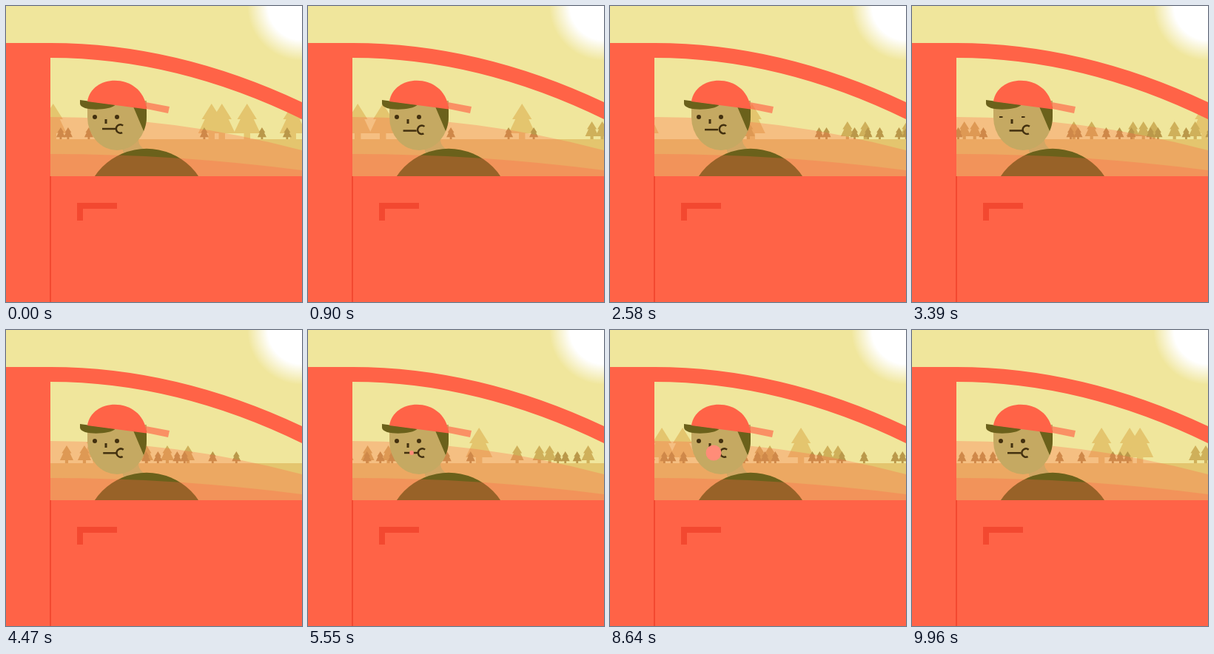
An HTML page with a canvas that plays this animation: 400 by 400 pixels, repeating every 9.99 s.

```html
<!DOCTYPE html>
<html lang="en">
<head>
<meta charset="utf-8">
<title>Country drive</title>
<style>
  html, body { margin: 0; width: 100%; height: 100%; overflow: hidden; background: #ff6347; }
  canvas { display: block; }
</style>
</head>
<body>
<canvas id="stage" width="400" height="400"></canvas>
<script>
const ctx = document.getElementById('stage').getContext('2d');
const LOOP = 9990;
const SKY = '#f0e69c', GROUND = '#e4c56e', CAR = '#ff6347', TRIM = '#f34830';
const OLIVE = '#6b611b', SKIN = '#c5a962', INK = '#42300f', GLASS = 'rgba(255,99,71,.3)';
const TREE = new Path2D('M0-16 4.4-9H3L6-2.7H1.4V0H-1.4V-2.7H-6L-3-9H-4.4Z');

// Nearer trees are bigger and pass faster, both by the same scale.
// An odd place holds a pair of trees, an even place a single one.
const ROWS = [
  { scale: 3, color: GROUND, spread: 7,
    places: [64, 285, 326, 388, 514, 694, 798, 838, 1246, 1630, 2262, 2290, 2450, 2790, 2835] },
  { scale: 1.5, color: '#cfb05a', spread: 7,
    places: [503, 644, 668, 724, 745, 780, 808, 982, 1019, 1078, 1148, 1262, 1305, 1397, 1657] },
  { scale: 1, color: '#ba984a', spread: 5,
    places: [79, 112, 268, 346, 380, 503, 546, 564, 580, 611, 654, 686, 809, 830, 912, 935, 954,
      1009, 1044, 1074, 1121, 1136] }
];
const BUBBLES = [5370, 7985];

const clamp = v => Math.max(0, Math.min(1, v));

function fill(color, path) {
  ctx.fillStyle = color;
  ctx.fill(new Path2D(path));
}

function circle(color, x, y, r) {
  ctx.fillStyle = color;
  ctx.beginPath();
  ctx.arc(x, y, r, 0, 2 * Math.PI);
  ctx.fill();
}

function rect(color, x, y, w, h) {
  ctx.fillStyle = color;
  ctx.fillRect(x, y, w, h);
}

// The car speeds up very slightly.
const travel = t => 0.083 * t + 1.8e-7 * t * t;

function bubbleRadius(t) {
  return Math.max(...BUBBLES.map(start => {
    const age = t - start;
    return 16 * Math.min(clamp(age / 1000), clamp((1200 - age) / 200));
  }));
}

function drawSun() {
  const glow = ctx.createRadialGradient(400, 0, 46, 400, 0, 74);
  glow.addColorStop(0, '#fff');
  glow.addColorStop(1, 'rgba(255,255,255,0)');
  circle(glow, 400, 0, 74);
}

function drawTree(x, scale, color) {
  ctx.save();
  ctx.translate(x, 180);
  ctx.scale(scale, scale);
  ctx.fillStyle = color;
  ctx.fill(TREE);
  ctx.restore();
}

function drawTrees(distance) {
  for (const { scale, color, spread, places } of ROWS) {
    for (const place of places) {
      const x = place - distance * scale;
      const offsets = place % 2 ? [-spread, spread] : [0];
      for (const offset of offsets) drawTree(x + offset, scale, color);
    }
  }
}

function drawFace(t) {
  const blinking = t % 4500 > 3330 && t % 4500 < 3450;
  for (const x of [120, 150]) {
    if (blinking) rect(INK, x - 2, 149, 4.5, 2);
    else circle(INK, x, 150, 3);
  }
  rect(INK, 133.5, 153, 3, 6);

  const r = bubbleRadius(t);
  const chew = 1 - clamp(r / 2), phase = t / 1440 * 2 * Math.PI;
  const dx = 2 * Math.sin(phase) * chew, dy = 1.5 * (1 - Math.cos(phase)) * chew;
  ctx.strokeStyle = INK;
  ctx.lineWidth = 2.5;
  ctx.stroke(new Path2D(`M${130 + dx} ${166 + dy}H${148 + dx}`));
  ctx.beginPath();
  ctx.arc(154.5 + dx / 2, 166 + dy / 2, 5.7, 1.1, 5.4);
  ctx.stroke();
  if (r > 0) circle('#ff8c78', 140, 166, r);
}

function drawDriver(t) {
  fill('#d1a764', 'M150 160H179V182Q180 190 188 194L160 204Z');
  circle(OLIVE, 190, 277.5, 84.7);
  fill(SKIN, 'M110 150V128H190V150A40 45 0 0 1 110 150Z');
  fill(OLIVE, 'M172 136H190V150Q190 160 186 169Z');
  drawFace(t);
  fill(OLIVE, 'M100 127 148 133.5C142 141 101 143 100 132Z');
  fill(CAR, 'M110 129C116 90 184 90 190 138V139.5Z');
  fill('rgba(255,99,71,.66)', 'M189 130 221 136 219 145 190 139Z');
}

function drawCar() {
  fill(CAR, 'M0 50H60Q230 50 400 130V153Q230 70 60 70V230H400V400H0Z');
  rect(TRIM, 59, 230, 2, 170);
  fill(TRIM, 'M96 266H150V274H104V290H96Z');
}

function draw() {
  const t = performance.now() % LOOP;
  rect(SKY, 0, 0, 400, 400);
  drawSun();
  rect(GROUND, 0, 180, 400, 60);
  drawTrees(travel(t));
  fill(GLASS, 'M60 150Q230 150 400 195V230H60Z');
  drawDriver(t);
  fill(GLASS, 'M60 200Q230 200 400 222V230H60Z');
  drawCar();
  requestAnimationFrame(draw);
}

draw();
</script>
</body>
</html>
```
